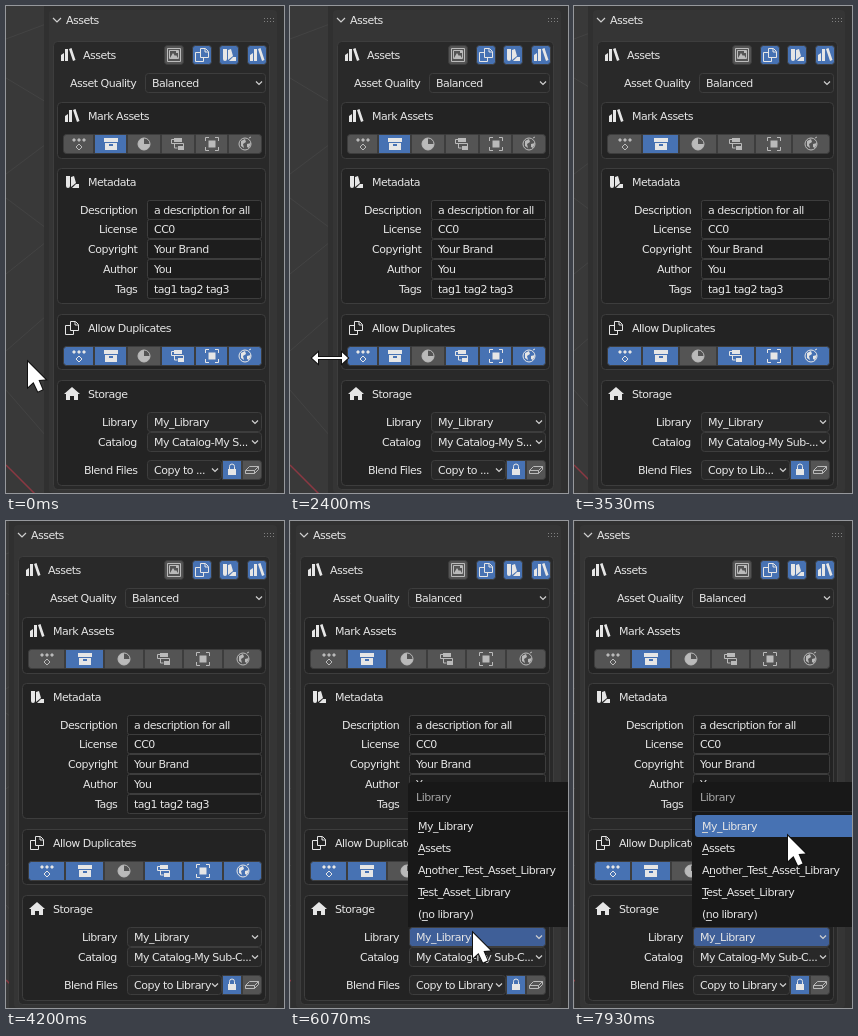
Write an HTML page with a canvas that moves like this. It is 278 px wide and 487 px high and loops after 8 s.

```html
<!DOCTYPE html>
<html lang="en">
<head>
<meta charset="utf-8">
<title>Assets panel</title>
<style>
html, body { margin: 0; width: 100%; height: 100%; overflow: hidden; background: #393939; }
canvas { display: block; }
</style>
</head>
<body>
<canvas id="stage" width="278" height="487"></canvas>
<script>
const ctx = document.getElementById('stage').getContext('2d');
const LOOP = 8000, RATE = 15 / 1000;
const BLUE = '#4772b3', GREY = '#545454', LINE = '#3d3d3d', DARK = '#1d1d1d', LIGHT = '#e6e6e6';
const FONT = '11px "DejaVu Sans", sans-serif';

// [filled path, stroked path], centred on 0,0
const ICONS = {
  books: ['M-7 6V0l3-2v8zM-3 6V-6h3v12zM1-6l2.5-1 4 12-2.5 1z', ''],
  image: ['M-4 3l3-5 2 3 1-1 2 3zM2-4h2v2h-2z', 'M-6.5-3v-3.5h13v13h-13v-9.5M-4.5-4.5h9v8h-9z'],
  pages: ['', 'M-1.5-6.5h5l3 3v6h-8zM3-6v3h3M-2-2.5h-4.5v9h8v-3.5'],
  swatch: ['M-6-6h4v10a2 2 0 0 1-4 0zM-1-5l3-1 2 7-5 4zM0 6l4-4h3v4z', ''],
  pose: ['M-5-6l2 2-2 2-2-2zM5-6l2 2-2 2-2-2zM0-6l2 2-2 2-2-2z', 'M0 0l3 3-3 3-3-3z'],
  box: ['M-7-6h14v4h-14zM-6-1h12v7h-12zM-2 0v2h4v-2z', ''],
  sphere: ['M0-6a6 6 0 0 0 0 12zM0 0h6a6 6 0 0 1-6 6z', 'M0-6a6 6 0 0 1 0 12a6 6 0 0 1 0-12z'],
  nodes: ['M-4-6h8v4h-8zM0 2h6v4h-6z', 'M-4-4.5h-2.5v4h12v3M-3.5 0v4h3'],
  object: ['M-3.5-3.5h7v7h-7z', 'M-6.5-3v-3.5h3.5M3-6.5h3.5v3.5M6.5 3v3.5h-3.5M-3 6.5h-3.5v-3.5'],
  world: ['M-4-3l4-2 1 3-3 2 1 4-3-2zM2 0l4-1-2 5-2-1z', 'M0-6a6 6 0 0 1 0 12a6 6 0 0 1 0-12zM4-6l2-1'],
  home: ['M0-7l8 7h-2v6h-4v-4h-4v4h-4v-6h-2z', ''],
  lock: ['M-4-1h8v6h-8z', 'M-2.5-1v-2.5a2.5 2.5 0 0 1 5 0v2.5'],
  slab: ['', 'M-2.5-3.5h9l-4 4h-9zM-6.5.5v3h9l4-4v-3M2.5.5v3']
};
for (const name in ICONS) ICONS[name] = ICONS[name].map(d => new Path2D(d));
const TYPES = ['pose', 'box', 'sphere', 'nodes', 'object', 'world'];
const MENU = [['My_Library', 0], ['Assets', 0], ['Another_Test_Asset_Library', 1],
  ['Test_Asset_Library', 0], ['(no library)', 1]];

// Keys: [step, value, ...], with 15 steps per second
const SHIFT = [[42, 0], [46, -11], [53, -24], [55, -24], [57, -28], [59, -28], [64, -37]];
const ARROW = [[21, 22, 356], [22, 24, 356], [32, 40, 353], [73, 8, 357], [80, 119, 409],
  [85, 180, 412], [86, 183, 412], [98, 183, 412], [108, 200, 391], [111, 206, 377],
  [112, 206, 377], [119, 214, 315]];
const RESIZE = [[33, 39], [34, 39], [35, 44], [36, 40]];

function at(keys, k, i = 1) {
  if (k <= keys[0][0]) return keys[0][i];
  for (let n = 1; n < keys.length; n++) {
    const a = keys[n - 1], b = keys[n];
    if (k <= b[0]) return a[i] + (b[i] - a[i]) * (k - a[0]) / (b[0] - a[0]);
  }
  return keys[keys.length - 1][i];
}

function rect(x0, y0, x1, y1, fill, r = 0, edge) {
  const o = edge ? .5 : 0;
  ctx.beginPath();
  ctx.roundRect(x0 + o, y0 + o, x1 - x0 - 2 * o, y1 - y0 - 2 * o, r);
  ctx.fillStyle = fill;
  ctx.fill();
  if (!edge) return;
  ctx.strokeStyle = edge;
  ctx.lineWidth = 1;
  ctx.stroke();
}

function text(str, x, y, color = LIGHT) {
  ctx.fillStyle = color;
  ctx.fillText(str, x, y + 4);
}

const label = (str, right, y) => text(str, Math.round(right - ctx.measureText(str).width), y);

function icon(name, x, y, color = LIGHT) {
  ctx.save();
  ctx.translate(Math.round(x), y);
  ctx.fillStyle = ctx.strokeStyle = color;
  ctx.lineWidth = 1;
  ctx.fill(ICONS[name][0], 'evenodd');
  ctx.stroke(ICONS[name][1]);
  ctx.restore();
}

function lines(points, color, width) {
  ctx.beginPath();
  for (let i = 0; i < points.length; i += 2) ctx.lineTo(points[i], points[i + 1]);
  ctx.strokeStyle = color;
  ctx.lineWidth = width;
  ctx.stroke();
}

const chevron = (x, y, r = 3) => lines([x - r, y - r / 2, x, y + r / 2, x + r, y - r / 2], '#d0d0d0', 1.2);

function dropdown(str, x, y, right, fill = '#282828') {
  rect(x, y - 10, right, y + 10, fill, 3, LINE);
  text(str, x + 7, y);
  chevron(right - 7, y);
}

function button(name, x, y, on, x1 = x + 20, r = 3) {
  rect(x, y - 10, x1, y + 10, on ? BLUE : GREY, r, LINE);
  icon(name, (x + x1) / 2, y, on ? LIGHT : '#bababa');
}

// The first button is 3px narrower than the rest
function typeRow(left, y, on) {
  const w = (259 - left) / 6;
  const edge = i => Math.round(Math.max(left, 256 - (6 - i) * w));
  TYPES.forEach((name, i) => {
    const r = i === 0 ? [3, 0, 0, 3] : i === 5 ? [0, 3, 3, 0] : 0;
    button(name, edge(i), y, on.includes(i), edge(i + 1), r);
  });
}

function section(name, title, s, y0, y1) {
  rect(51 + s, y0, 260, y1, '#232323', 4, LINE);
  icon(name, 66 + s, y0 + 14);
  text(title, 82 + s, y0 + 14);
}

const clip = (str, n) => n < str.length ? str.slice(0, n) + '...' : str;
const split = (left, right) => Math.floor(left + (right - left) * .42 + .85);

function viewport() {
  rect(0, 0, 278, 487, '#393939');
  [[33, 18], [72, 96], [168, 138], [192, 222], [268, 236], [345, 310], [384, 430]]
    .forEach(([a, b]) => lines([0, a, 40, b], '#434343', 1));
  lines([0, 459, 29, 488], '#8a3842', 1.5);
}

function panel(s, open) {
  const left = 57 + s, field = split(left, 256), quality = split(51 + s, 260);
  rect(38 + s, 0, 278, 487, '#303030');
  rect(43 + s, 4, 271, 487, '#353535', 4);
  chevron(51 + s, 14, 4);
  text('Assets', 60 + s, 14);
  for (let i = 0; i < 8; i++) {
    const x = 258 + i % 4 * 3, y = i < 4 ? 12 : 15;
    rect(x, y, x + 1, y + 1, '#808080');
  }

  rect(47 + s, 35, 264, 484, '#292929', 4, LINE);
  icon('books', 62 + s, 49);
  text('Assets', 77 + s, 49);
  ['image', 'pages', 'swatch', 'books'].forEach((name, i) => button(name, 158 + Math.round(i * 27.6), 49, i > 0));
  label('Asset Quality', quality - 9, 77);
  dropdown('Balanced', quality, 77, 260);

  section('books', 'Mark Assets', s, 96, 153);
  typeRow(left, 138, [1]);

  section('swatch', 'Metadata', s, 162, 298);
  [['Description', 'a description for all'], ['License', 'CC0'], ['Copyright', 'Your Brand'],
    ['Author', 'You'], ['Tags', 'tag1 tag2 tag3']].forEach(([name, value], i) => {
    const y = Math.floor(204 + i * 19.8);
    rect(field, y - 10, 256, y + 10, DARK, 2, LINE);
    label(name, field - 10, y);
    text(value, field + 7, y);
  });

  section('pages', 'Allow Duplicates', s, 308, 364);
  typeRow(left, 350, [0, 1, 3, 4, 5]);

  section('home', 'Storage', s, 374, 480);
  label('Library', field - 10, 416);
  dropdown('My_Library', field, 416, 256, open ? '#3f5f98' : undefined);
  label('Catalog', field - 10, 436);
  dropdown(clip('My Catalog-My Sub-Catalog', 15 + Math.round(-s / 9.2)), field, 436, 256);
  const shown = 8 + Math.round(-s / 7);
  label('Blend Files', field - 10, 464);
  dropdown(clip('Copy to Library', shown > 12 ? 15 : shown), field, 464, 216);
  button('lock', 216, 464, true, 236, 0);
  button('slab', 236, 464, false, 256, [0, 3, 3, 0]);
}

function menu(y) {
  const hot = Math.floor((y - 294) / 22);
  rect(118, 261, 290, 406, '#181818', [4, 0, 0, 0]);
  text('Library', 126, 276, '#a6a6a6');
  rect(118, 290, 290, 291, '#2c2c2c');
  MENU.forEach(([name, key], i) => {
    const cy = 305 + i * 22;
    if (i === hot) rect(121, cy - 11, 290, cy + 11, BLUE, 3);
    text(name, 128, cy);
    const x = 128 + ctx.measureText(name.slice(0, key)).width;
    rect(x, cy + 6, x + 6, cy + 7, '#d0d0d0');
  });
}

function shape(points, x, y) {
  ctx.beginPath();
  for (let i = 0; i < points.length; i += 2) ctx.lineTo(x + points[i], y + points[i + 1]);
  ctx.closePath();
  ctx.lineWidth = 2;
  ctx.strokeStyle = '#111';
  ctx.stroke();
  ctx.fillStyle = '#fff';
  ctx.fill();
}

function cursor(k, s) {
  if (k < 33 || k >= 73) {
    shape([0, 0, 0, 25, 5.5, 20, 10, 29.5, 14.5, 27.5, 10.5, 18, 17.5, 17.5], at(ARROW, k), at(ARROW, k, 2));
  } else if (s > -21) {
    shape([-18, 0, -12, -5.5, -12, -1, 12, -1, 12, -5.5, 18, 0, 12, 5.5, 12, 1, -12, 1, -12, 5.5],
      at(RESIZE, k) + s, 352);
  }
}

function draw(now) {
  const k = Math.floor((now % LOOP + 4) * RATE);
  const s = Math.round(at(SHIFT, k));
  const open = k >= 91;
  ctx.font = FONT;
  ctx.letterSpacing = '-0.5px';
  viewport();
  panel(s, open);
  if (open) menu(at(ARROW, k, 2));
  cursor(k, s);
}

let start;
function tick(now) {
  start ??= now;
  draw(now - start);
  requestAnimationFrame(tick);
}
draw(0);
requestAnimationFrame(tick);
</script>
</body>
</html>
```
